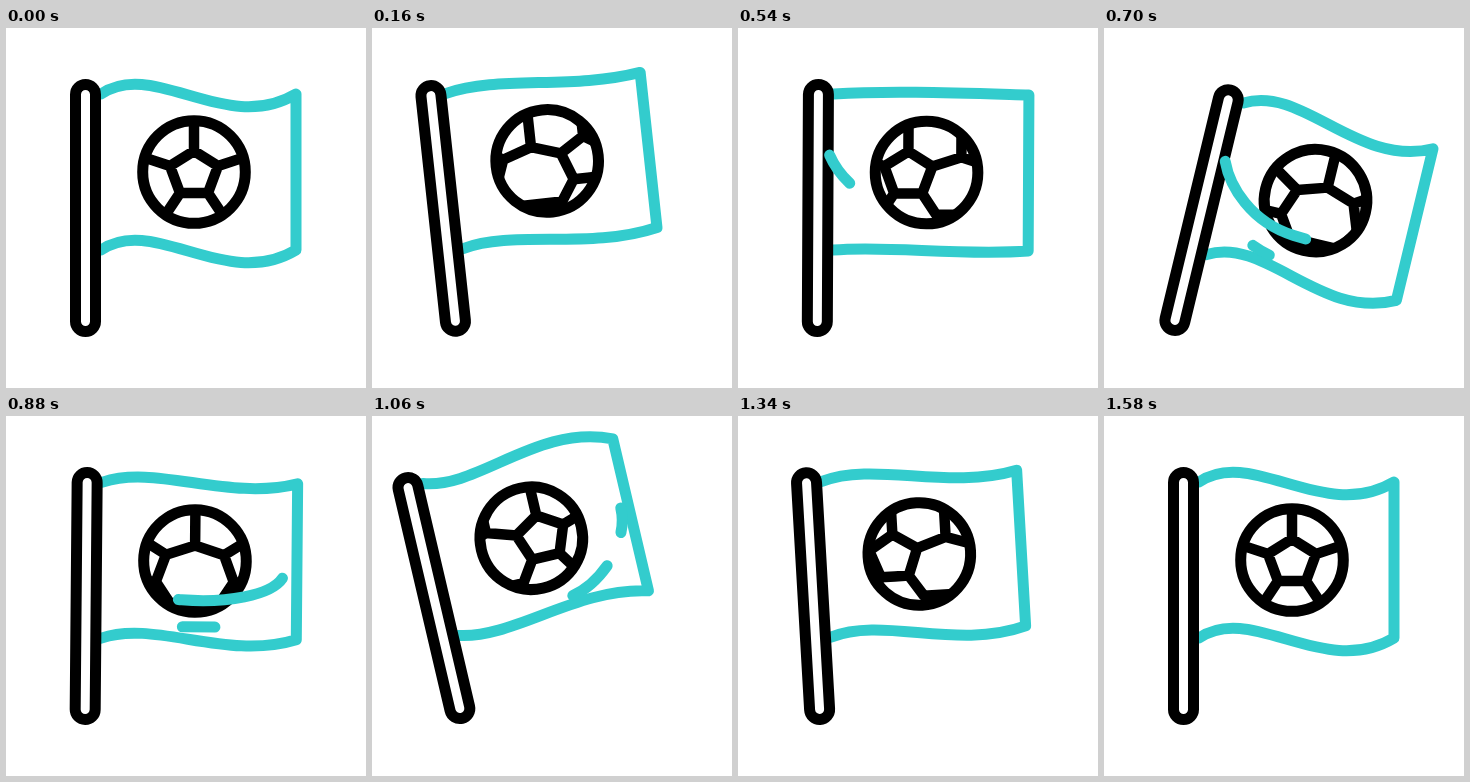
An HTML page for the animation above (2.4 s loop, 360x360 px).

```html
<!DOCTYPE html>
<html lang="en">
<head>
<meta charset="utf-8">
<title>Football flag</title>
<style>
  html, body { margin: 0; width: 100%; height: 100%; overflow: hidden; background: #fff; }
  svg { display: block; width: 100vw; height: 100vh; }
  path, rect, circle { fill: none; stroke-width: 11; stroke-linecap: round; stroke-linejoin: round; }
  .teal { stroke: #33cccd; }
  .ink { stroke: #000; }
  #pole { fill: #fff; }
  #seams { stroke-width: 10.5; }
</style>
</head>
<body>
<svg viewBox="0 0 360 360">
  <defs><clipPath id="disc"><circle cx="188" cy="144" r="52"/></clipPath></defs>
  <g id="flag">
    <path id="cloth" class="teal"/>
    <rect id="pole" class="ink" x="69.5" y="56.5" width="20" height="247" rx="10"/>
    <g clip-path="url(#disc)"><path id="seams" class="ink"/></g>
    <circle class="ink" cx="188" cy="144" r="51.3"/>
    <path id="gust1" class="teal" pathLength="1"
      d="M91 127C101 150 130 180 175 183C220 186 265 178 276 160C280 152 282 144 282 135"/>
    <path id="gust2" class="teal" pathLength="1"
      d="M118 192C140 206 160 210 178 210H210C230 208 247 197 262 182"/>
  </g>
</svg>
<script>
const LOOP = 2400, STEP = 20, END = 1580;
const PERIOD = 106; // distance between neighbouring pentagons
const $ = id => document.getElementById(id);

const mix = (a, b, p) => a + (b - a) * p;
const sine = p => (1 - Math.cos(Math.PI * p)) / 2;
const ramp = (t, from, to) => Math.min(1, Math.max(0, (t - from) / (to - from)));

// Swing from extreme to extreme, slowing down at each
function swing(t, times, values) {
  let v = values[0];
  for (let i = 1; i < times.length; i++) {
    v = mix(v, values[i], sine(ramp(t, times[i - 1], times[i])));
  }
  return v;
}

const tilt = t => swing(t, [0, 360, 705, 1060, 1480], [0, -15, 13.6, -13.2, 0]);
const wave = t => swing(t, [0, 350, 780, 1040, 1540], [1, 0, 1, 0, 1]);

// Five turns: speeding up for three and a half, then running out
const turns = t => 3.5 * ramp(t, 0, 880) ** 1.33
  + 1.5 * (1 - (1 - ramp(t, 880, END)) ** 1.7);

function clothPath(w) {
  const crest = mix(18, -36, w), trough = mix(-32, 42, w);
  const lowCrest = mix(16, -36, w), lowTrough = mix(-20, 42, w);
  return `M95 66C148 ${66 + crest} 220 ${66 + trough} 290 66`
    + `V222C220 ${222 + lowTrough} 148 ${222 + lowCrest} 95 222`;
}

// One repeat of the ball's pattern, drawn as two mirrored halves
function patch(x) {
  const half = s => {
    const p = (dx, y) => `${x + s * dx} ${y}`;
    return `M${p(0, 90)}L${p(0, 123)}L${p(24, 138)}L${p(14, 165)}L${p(0, 165)}`
      + `M${p(24, 138)}L${p(PERIOD / 2, 128.5)}L${p(PERIOD / 2, 85)}`
      + `M${p(14, 165)}L${p(28, 186)}L${p(PERIOD / 2, 186)}`;
  };
  return half(-1) + half(1);
}

function drawGust(id, head, tail) {
  const el = $(id), len = head - tail;
  el.style.display = len > 0.005 ? '' : 'none';
  el.setAttribute('stroke-dasharray', `${len} 2`);
  el.setAttribute('stroke-dashoffset', -tail);
}

function draw(t) {
  $('flag').setAttribute('transform', `rotate(${tilt(t)} 79.5 257)`);
  $('cloth').setAttribute('d', clothPath(wave(t)));
  const x = 188 + (turns(t) % 1) * PERIOD;
  $('seams').setAttribute('d', [-1, 0, 1].map(k => patch(x + k * PERIOD)).join(''));
  drawGust('gust1', ramp(t, 473, 931), ramp(t, 714, 1100));
  drawGust('gust2', ramp(t, 560, 1090), ramp(t, 600, 1310));
}

const start = performance.now();
function tick() {
  const t = (performance.now() - start) % LOOP;
  draw(Math.floor(t / STEP) * STEP);
  requestAnimationFrame(tick);
}
tick();
</script>
</body>
</html>
```
